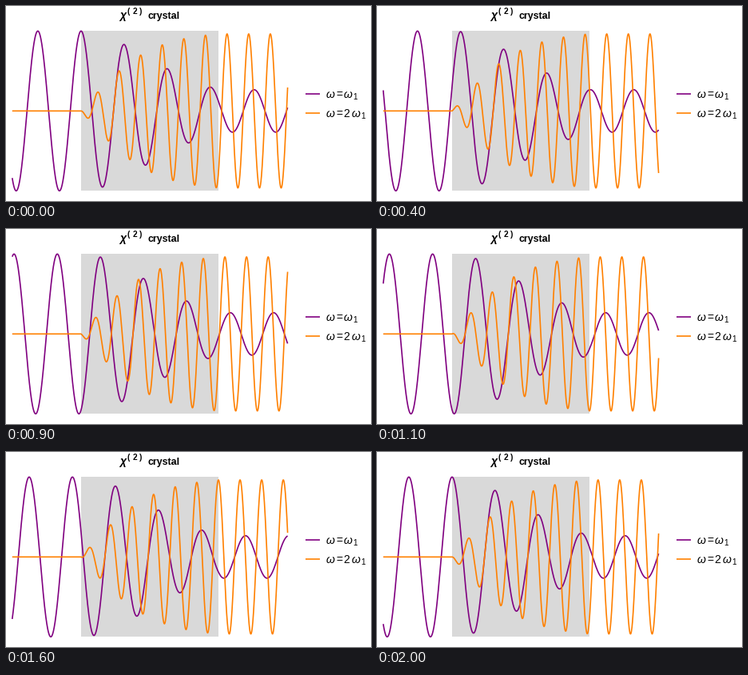
Recreate the animation shown at these times as a matplotlib script. Size 457 by 244 pixels, loop 2100 ms.

```python
import numpy as np
import matplotlib.pyplot as plt
from matplotlib.animation import FuncAnimation
from matplotlib.patches import Rectangle

W, H, DPI = 457, 244, 100
STEPS = 20                      # steps per wave period
PURPLE, ORANGE, GRAY = "#800080", "#ff8000", "#d9d9d9"
PT = 72 / DPI                   # points per pixel

LENGTH, DECAY = 20, 10          # crystal length, conversion length
X0, Y0, SX, SY = 94, 131.3, 8.62, 100

fig = plt.figure(figsize=(W / DPI, H / DPI), dpi=DPI, facecolor="white")
ax = fig.add_axes([0, 0, 1, 1])
ax.set(xlim=(0, W), ylim=(H, 0))
ax.axis("off")


def label(x, y, s, size, **style):
    ax.text(x, y, s, fontsize=size * PT, family="Liberation Sans",
            va="baseline", **style)


def stroke(x, y, color):
    return ax.plot(x, y, color=color, lw=1.65 * PT, solid_capstyle="butt")[0]


ax.add_patch(Rectangle((X0, 31), LENGTH * SX, 200, fc=GRAY, lw=0))

label(142, 16, "χ", 14, weight="bold", style="italic")
for x, ch in ((152, "("), (158.6, "2"), (167, ")")):
    label(x, 10.3, ch, 10, weight="bold")
label(177.7, 16, "crystal", 12.4, weight="bold")


def legend_row(y, color, factor):
    stroke([375, 393], [y, y], color)
    base = y + 4.6
    label(401, base, "ω", 14, style="italic")
    label(413, base, "=", 14)
    x = 422.3
    if factor:
        label(x, base, factor, 14)
        x += 10
    label(x, base, "ω", 14, style="italic")
    label(x + 12, base + 2.6, "1", 10)


legend_row(110, PURPLE, "")
legend_row(134, ORANGE, "2")

x = np.linspace(-10, 30, 1601)
depth = np.clip(x, 0, LENGTH) / DECAY
px = X0 + SX * x
fundamental = stroke(px, 0 * x, PURPLE)
harmonic = stroke(px, 0 * x, ORANGE)


def update(i):
    phase = x - 2 * np.pi * i / STEPS
    fundamental.set_ydata(Y0 - SY * np.cos(phase) / np.cosh(depth))
    harmonic.set_ydata(Y0 + SY * np.sin(2 * phase) * np.tanh(depth))
    return fundamental, harmonic


anim = FuncAnimation(fig, update, frames=STEPS + 1, interval=100,
                     repeat=True, repeat_delay=0)
plt.show()
```
